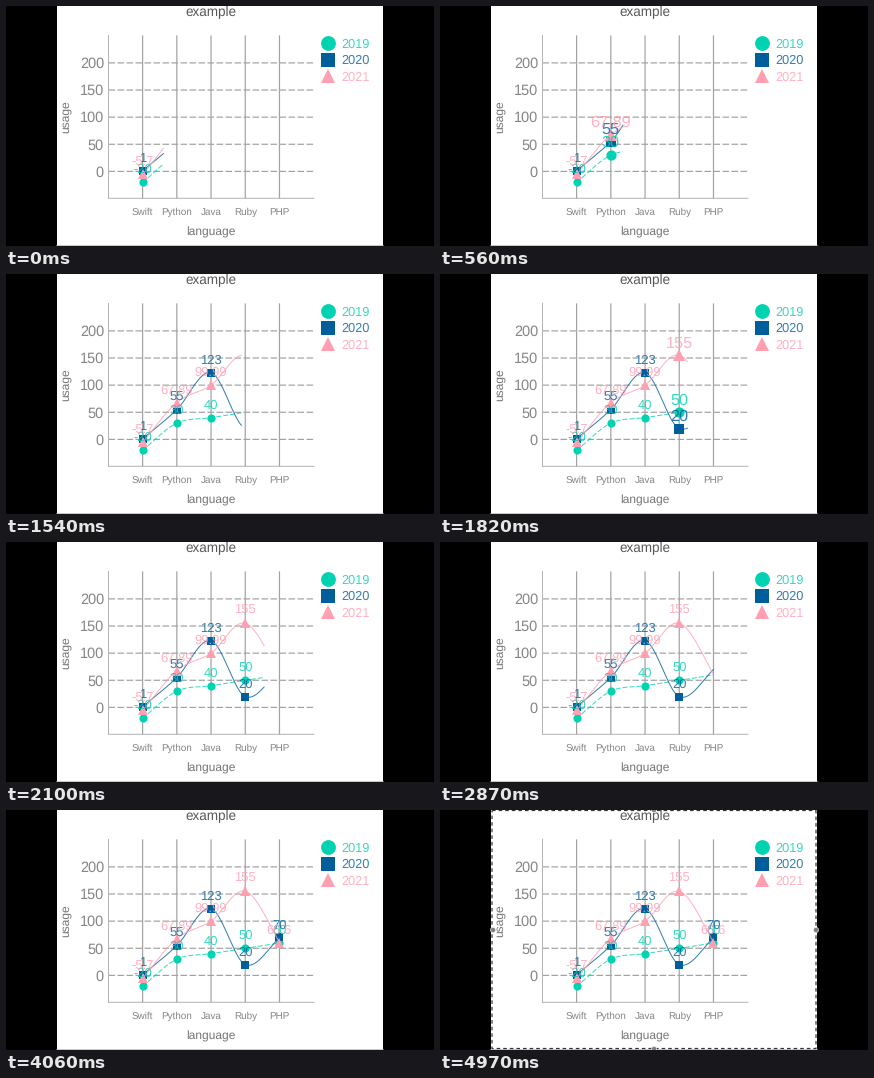
Recreate the animation shown at these times as a matplotlib script. Size 428x240 px, loop 5.25 s.

```python
import numpy as np
import matplotlib.pyplot as plt
from matplotlib.animation import FuncAnimation
from matplotlib.patches import Circle, Rectangle

W, H, DPI = 428, 240, 100
STEP, FRAMES = 70, 75
PT = 72 / DPI

plt.rcParams["font.family"] = "Liberation Sans"
plt.rcParams["text.hinting"] = "none"
fig = plt.figure(figsize=(W / DPI, H / DPI), dpi=DPI, facecolor="black")
ax = fig.add_axes([0, 0, 1, 1])
ax.set_xlim(0, W)
ax.set_ylim(H, 0)
ax.axis("off")

TEAL, BLUE, PINK = "#00d3b1", "#005f9b", "#ff9fb2"
GRID, AXIS = "#a2a2a2", "#b4b4b4"
X0, DX, Y0, UNIT = 136.6, 34.22, 165.4, 0.5425
LABEL_SIZE = 13


def text(x, y, s, size, color, ha="center", **kw):
    return ax.text(x, y, s, fontsize=size * PT, color=color, ha=ha,
                   va="baseline", **kw)


def line(xs, ys, color, width=1.0, **kw):
    return ax.plot(xs, ys, color=color, lw=width * PT, snap=False, **kw)[0]


def dot(x, y, shape, size, color, **kw):
    return line([x], [y], color, ls="", marker=shape, ms=size * PT,
                mew=0, **kw)


def to_y(value):
    return Y0 - UNIT * value


# Panel, grid and axes
ax.add_patch(Rectangle((51, 0), 326, 240, fc="white", lw=0, snap=False))
line([51, 377], [239.5, 239.5], "#c4c8c6")
for value in range(0, 201, 50):
    y = to_y(value)
    line([102.5, 308], [y, y], GRID, 1.2, dashes=(5.5, 2))
    text(98, y + 5.2, str(value), 14.5, "#858585", ha="right")
for i, name in enumerate(["Swift", "Python", "Java", "Ruby", "PHP"]):
    x = X0 + DX * i
    line([x, x], [30, 192], GRID, 1.2)
    text(x, 209.3, name, 9.9, "#858585")
line([102.5, 102.5], [29.5, 192.3], AXIS)
line([102.5, 308], [192.3, 192.3], AXIS)
text(205, 10.3, "example", 13.5, "#585858")
text(205, 230, "language", 12, "#757575")
text(62.8, 111, "usage", 12, "#757575", rotation=90,
     rotation_mode="anchor")


class Series:
    def __init__(self, values, color, shape, size, order, dashes=None):
        self.values = np.array(values, float)
        self.size = size
        style = {"dashes": dashes} if dashes else {}
        self.path = line([], [], color, 1.0, alpha=0.8, zorder=5 + order,
                         **style)
        self.marks, self.labels = [], []
        for i, value in enumerate(values):
            x, y = X0 + DX * i, to_y(value)
            self.marks.append(dot(x, y, shape, size, color,
                                  zorder=5.1 + order))
            self.labels.append(text(x, y - 9, f"{value:g}", LABEL_SIZE,
                                    color, alpha=0.8, zorder=6 + order))
        slopes = np.diff(self.values)
        self.tangents = np.concatenate(
            [slopes[:1], (slopes[1:] + slopes[:-1]) / 2, slopes[-1:] * 1.2])

    def curve(self, u):
        """Cubic through all points, u counted in categories."""
        i = np.minimum(u.astype(int), len(self.values) - 2)
        t = u - i
        v, m = self.values, self.tangents
        return ((2 * t**3 - 3 * t**2 + 1) * v[i]
                + (t**3 - 2 * t**2 + t) * m[i]
                + (3 * t**2 - 2 * t**3) * v[i + 1]
                + (t**3 - t**2) * m[i + 1])

    def show(self, tip, scales):
        u = np.linspace(0, tip, int(tip * 40) + 2)
        self.path.set_data(X0 + DX * u, to_y(self.curve(u)))
        for value, mark, label, s in zip(self.values, self.marks,
                                         self.labels, scales):
            mark.set_visible(s > 0.02)
            label.set_visible(s > 0.02)
            s = max(s, 0.02)
            mark.set_markersize(self.size * s * PT)
            label.set_fontsize(LABEL_SIZE * s * PT)
            label.set_y(to_y(value) - 13.5 + 0.35 * LABEL_SIZE * s)


series = [
    Series([-20, 30, 40, 50, 60], TEAL, "o", 8.2, 0, dashes=(5, 2)),
    Series([1, 55, 123, 20, 70], BLUE, "s", 8.2, 0.2),
    Series([-5.7, 67.89, 99.99, 155, 60.6], PINK, "^", 9.6, 0.4),
]

# Legend
for y, name, color, shape in [(37, "2019", TEAL, "o"),
                              (53.6, "2020", BLUE, "s"),
                              (70.2, "2021", PINK, "^")]:
    dot(322.5, y, shape, 14.8, color)
    text(335, y + 4.6, name, 12.8, color, ha="left", alpha=0.8)

# Selection frame shown at the end
selection = [line([52, 376, 376, 52, 52], [0.5, 0.5, 238.5, 238.5, 0.5],
                  "#333333", 1.2, dashes=(3, 2.5), zorder=9)]
for x, y in [(53, 120), (376, 120), (214, 239), (214, 0)]:
    selection.append(ax.add_patch(
        Circle((x, y), 2.6, fc="#808080", ec="white", lw=0.4, zorder=10)))

# Line progress over time, in categories
TIP = ([0, 315, 1005, 1610, 2100, 2870], [0.61, 1, 2, 3, 3.55, 4])
# Start and slowness of the pop at each later category
POPS = [(315, 1), (1005, 1), (1610, 1), (2870, 2.5)]


def pop(t, start, slow):
    """Grow past full size, hold, settle."""
    return np.interp((t - start) / slow, [0, 140, 250, 400],
                     [0, 1.25, 1.25, 1])


def update(n):
    t = n * STEP
    tip = np.interp(t, *TIP)
    scales = [1] + [pop(t, *p) for p in POPS]
    for s in series:
        s.show(tip, scales)
    for part in selection:
        part.set_visible(t >= 4970)
    return []


anim = FuncAnimation(fig, update, frames=FRAMES, interval=STEP,
                     repeat=True, repeat_delay=0, blit=False)
plt.show()
```
